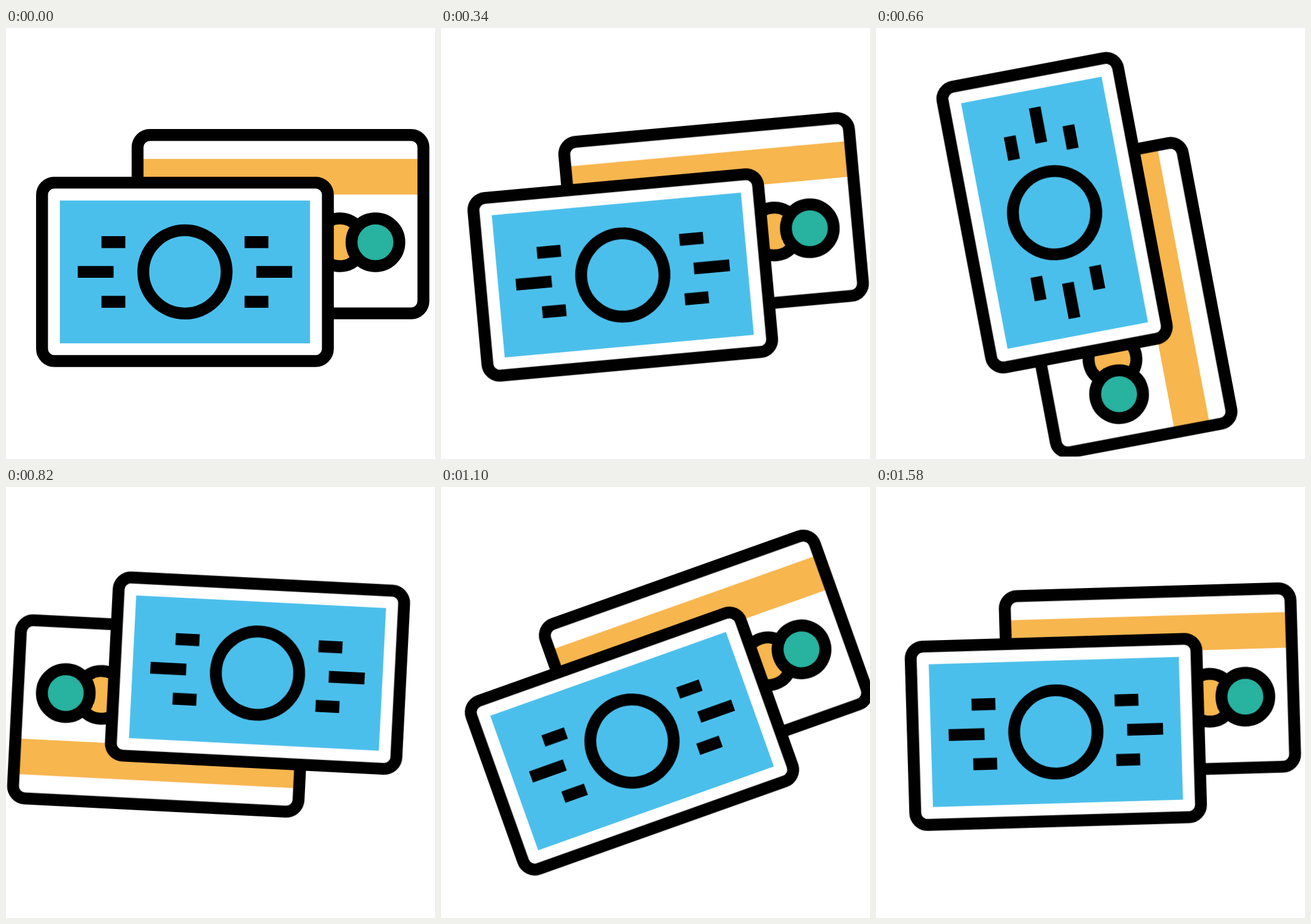
Animation, 700 px wide and 704 px high, one loop 1600 ms. Source, as an HTML page without scripts:

```html
<!DOCTYPE html>
<html lang="en">
<head>
<meta charset="utf-8">
<title>Spinning cash and card</title>
<style>
  html, body { margin: 0; width: 100%; height: 100%; overflow: hidden; background: #fff; }
  svg { display: block; width: 700px; height: 700px; overflow: hidden; }

  .outline { stroke: #000; stroke-width: 19.4; }
  .white { fill: #fff; }
  .orange { fill: #f7b64e; }
  .teal { fill: #28b2a0; }
  .blue { fill: #4bbfeb; }

  .spin {
    transform-box: view-box;
    transform-origin: 350px 349.7px;
    animation: spin 1.6s 1ms infinite;
  }

  /* wind up, full turn, overshoot, settle */
  @keyframes spin {
    0%      { transform: rotate(0deg);      animation-timing-function: cubic-bezier(.333, 0, .667, 1); }
    18.125% { transform: rotate(-6.7deg);   animation-timing-function: cubic-bezier(.333, 0, .667, .333); }
    21.25%  { transform: rotate(-5.2deg);   animation-timing-function: cubic-bezier(.333, .109, .667, .441); }
    33.75%  { transform: rotate(31.4deg);   animation-timing-function: cubic-bezier(.333, .256, .667, .573); }
    41.25%  { transform: rotate(79.3deg);   animation-timing-function: cubic-bezier(.333, .264, .667, .622); }
    51.25%  { transform: rotate(182.9deg);  animation-timing-function: cubic-bezier(.333, .351, .667, .719); }
    60%     { transform: rotate(280.9deg);  animation-timing-function: cubic-bezier(.333, .44, .667, .762); }
    67.5%   { transform: rotate(334.4deg);  animation-timing-function: cubic-bezier(.333, .702, .667, .978); }
    80%     { transform: rotate(364.7deg);  animation-timing-function: cubic-bezier(.333, -.149, .667, .88); }
    93.125% { transform: rotate(360deg);    animation-timing-function: cubic-bezier(.333, .14, .667, .546); }
    100%    { transform: rotate(357.76deg); }
  }
</style>
</head>
<body>
<svg viewBox="0 0 700 700">
  <defs>
    <rect id="frame" width="466.4" height="291.4" rx="20"/>
    <path id="bars" d="M155.8 340h38.9v19.4h-38.9zM117 388.7h58.5v19.4H117zM155.8 437.6h38.9V457h-38.9z"/>
  </defs>
  <g class="spin">
    <g id="card">
      <use href="#frame" x="214.7" y="174.7" class="white"/>
      <rect x="220" y="213.8" width="456" height="58.2" class="orange"/>
      <use href="#frame" x="214.7" y="174.7" class="outline" fill="none"/>
      <circle cx="544.6" cy="350" r="39" class="orange outline"/>
      <circle cx="602.8" cy="350" r="39" class="teal outline"/>
    </g>
    <g id="bill">
      <use href="#frame" x="58.8" y="252.6" class="white outline"/>
      <rect x="87.9" y="281.8" width="408.2" height="233.3" class="blue"/>
      <circle cx="292" cy="398.4" r="68" class="blue outline"/>
      <use href="#bars"/>
      <use href="#bars" transform="translate(584) scale(-1 1)"/>
    </g>
  </g>
</svg>
</body>
</html>
```
